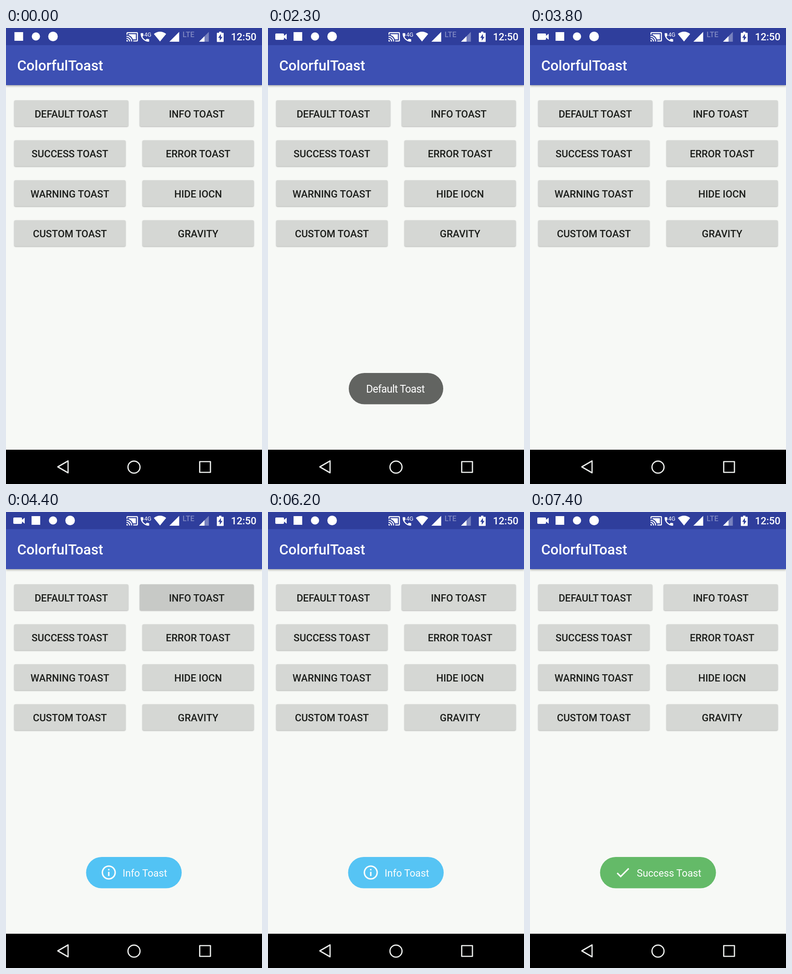
An HTML page for the animation above (8000 ms loop, 561 by 998 pixels).

```html
<!DOCTYPE html>
<html lang="en">
<head>
<meta charset="utf-8">
<title>Colorful toasts</title>
<style>
  html, body { margin: 0; width: 100%; height: 100%; overflow: hidden; background: #f7f9f6; }
  svg { display: block; width: 100%; height: 100%; }
  text { font-family: Roboto, "Noto Sans", sans-serif; }
  .med { font-weight: 500; }
  .bar { filter: drop-shadow(0 2px 2px rgba(0, 0, 0, .32)); }
  .button { fill: #d5d7d4; filter: drop-shadow(0 1.5px 1px rgba(0, 0, 0, .3)); }
  .label { font-size: 21.8px; text-anchor: middle; fill: #1b1d1a; }
  .toast text { fill: #fff; font-size: 21.8px; }
</style>
</head>
<body>
<svg viewBox="0 0 561 998" preserveAspectRatio="none">
  <defs id="clips"></defs>
  <rect width="561" height="998" fill="#f7f9f6"/>
  <rect class="bar" y="37" width="561" height="88" fill="#3d50b3"/>
  <rect width="561" height="37.5" fill="#2f3e9c"/>
  <text class="med" x="24.5" y="93" font-size="31.2" fill="#fff">ColorfulToast</text>

  <!-- status bar -->
  <g fill="#fff">
    <path id="camera" d="M18 12h15q2 0 2 2v3l6-4.5v13l-6-4.500v3q0 2-2 2h-15q-2 0-2-2v-10q0-2 2-2z"/>
    <g id="notes">
      <rect x="56" y="9" width="19" height="19"/>
      <circle cx="103" cy="18.500" r="9"/>
      <circle cx="140.500" cy="18.500" r="10.500"/>
    </g>
    <path transform="translate(262.900 5.600) scale(1.14)" d="M1 18v3h3c0-1.660-1.340-3-3-3zm0-4v2c2.760 0 5 2.240 5 5h2c0-3.870-3.130-7-7-7zm18-7H5v1.630c3.960 1.280 7.090 4.410 8.370 8.370H19V7zM1 10v2c4.970 0 9 4.030 9 9h2c0-6.080-4.930-11-11-11zm20-7H3c-1.100 0-2 .9-2 2v3h2V5h18v14h-7v2h7c1.100 0 2-.9 2-2V5c0-1.100-.9-2-2-2z"/>
    <path transform="translate(291.900 8.200) scale(1.04)" d="M20 15.400q-1.800 0-3.500-.6-.6-.1-1 .3l-2.200 2.200q-4.300-2.200-6.600-6.600l2.200-2.200q.4-.4.2-1-.6-1.700-.6-3.500 0-1-1-1H4q-1 0-1 1A17 17 0 0 0 20 21q1 0 1-1v-3.600q0-1-1-1z"/>
    <text x="303" y="18.500" font-size="12.500">4G</text>
    <path d="M337.500 29.500L324 13Q337.500 3 351 13z"/>
    <path d="M358 30h21.500v-21.500z"/>
    <text class="med" x="387" y="20" font-size="16" opacity=".38">LTE</text>
    <path d="M423 30h21.500v-21.500z" opacity=".35"/>
    <path d="M423 30h12v-12z"/>
    <path d="M467 8h5v2.500h4q1 0 1 1v18q0 1-1 1h-13q-1 0-1-1v-18q0-1 1-1h4z"/>
    <path d="M471 13l-6 8.500h3.500v6.500l6-8.500h-3.500z" fill="#2f3e9c"/>
    <text class="med" x="493" y="27" font-size="22">12:50</text>
  </g>

  <g id="buttons"></g>
  <g id="taps"></g>

  <!-- toasts -->
  <g class="toast">
    <rect x="177" y="755" width="207" height="68.500" rx="34.250" fill="#626461"/>
    <text x="215" y="798" style="font-size:23px;letter-spacing:-.65px">Default Toast</text>
  </g>
  <g class="toast">
    <rect x="175.500" y="755" width="209.500" height="68.500" rx="34.250" fill="#27b5f4"/>
    <g transform="translate(206.500 770.300) scale(1.558)">
      <circle cx="12" cy="12" r="9" fill="none" stroke="#fff" stroke-width="2"/>
      <path d="M11 7h2v2h-2zM11 11h2v6h-2z" fill="#fff"/>
    </g>
    <text x="255.500" y="797.500">Info Toast</text>
  </g>
  <g class="toast">
    <rect x="153.500" y="755" width="254" height="68.500" rx="34.250" fill="#64ba68"/>
    <path transform="translate(184.700 770.300) scale(1.558)" fill="#fff"
      d="M9 16.200L4.800 12l-1.400 1.400L9 19 21 7l-1.400-1.400z"/>
    <text x="234" y="797.500">Success Toast</text>
  </g>

  <!-- navigation bar -->
  <rect y="923" width="561" height="75"/>
  <g fill="none" stroke="#eceeec" stroke-width="2.700" stroke-linejoin="round">
    <path d="M113.500 960.500L136 947.500V973.500z"/>
    <circle cx="280.500" cy="961" r="13.200"/>
    <rect x="424.500" y="949" width="23.500" height="23.500"/>
  </g>
</svg>
<script>
const LOOP = 8000, STEP = 100, FADE = 500;
const el = id => document.getElementById(id);
const clamp = v => Math.max(0, Math.min(1, v));

function add(parent, tag, attrs, text) {
  const node = document.createElementNS("http://www.w3.org/2000/svg", tag);
  for (const key in attrs) node.setAttribute(key, attrs[key]);
  if (text) node.textContent = text;
  return parent.appendChild(node);
}

const labels = ["DEFAULT TOAST", "INFO TOAST", "SUCCESS TOAST", "ERROR TOAST",
  "WARNING TOAST", "HIDE IOCN", "CUSTOM TOAST", "GRAVITY"];

const boxes = labels.map((label, i) => {
  const row = i >> 1, right = i % 2;
  const width = row ? 244 : 250;
  const box = { x: right ? 543 - width : 18, y: 158.3 + row * 87.5, width, height: 57, rx: 3 };
  add(el("buttons"), "rect", { ...box, class: "button" });
  return box;
});

// Each tap presses one button and raises one toast.
const taps = [
  { button: 0, x: 195, y: 184, down: 900, show: 1166, hide: 3170, shade: .08 },
  { button: 1, x: 420, y: 184, down: 3900, show: 4130, hide: 5960, shade: .08 },
  { button: 2, x: 180, y: 273, down: 6700, show: 6890, hide: 8900, shade: 0 }
];
const toasts = document.querySelectorAll(".toast");

taps.forEach((tap, i) => {
  const box = boxes[tap.button];
  add(add(el("clips"), "clipPath", { id: "clip" + i }), "rect", box);
  const group = add(el("taps"), "g", { "clip-path": `url(#clip${i})` });
  tap.press = add(group, "rect", box);
  tap.ripple = add(group, "circle", { cx: tap.x, cy: tap.y });
  tap.dot = add(el("taps"), "circle", { cx: tap.x, cy: tap.y, r: 16.5,
    fill: "#fff", "fill-opacity": .2, stroke: "#fff", "stroke-opacity": .3, "stroke-width": 2 });
  tap.toast = toasts[i];
});

labels.forEach((label, i) => {
  const { x, y, width } = boxes[i];
  add(el("taps"), "text", { class: "label med", x: x + width / 2, y: y + 37.2 }, label);
});

function drawTap(tap, t) {
  const age = t - tap.down;
  const held = age < 0 ? 0 : clamp(age / 150) * clamp((700 - age) / 400);
  tap.press.setAttribute("opacity", tap.shade * held);
  tap.ripple.setAttribute("opacity", .06 * held);
  tap.ripple.setAttribute("r", tap.shade ? 30 + .25 * Math.max(0, age) : Math.min(105, 30 + .25 * Math.max(0, age)));
  tap.dot.setAttribute("opacity", age < 0 ? 0 : clamp((400 - age) / 200));

  const enter = clamp((t - tap.show) / FADE);
  const leave = clamp((t - tap.hide) / FADE);
  tap.toast.setAttribute("opacity", (1 - (1 - enter) ** 2) * (1 - leave ** 2));
}

function draw(now) {
  const t = Math.floor(now % LOOP / STEP) * STEP;
  const slide = clamp(t / 200);
  el("camera").setAttribute("opacity", slide);
  el("notes").setAttribute("transform", `translate(${-37.5 * (1 - slide)} 0)`);
  taps.forEach(tap => drawTap(tap, t));
}

const start = performance.now();
function tick() {
  draw(performance.now() - start);
  requestAnimationFrame(tick);
}
tick();
</script>
</body>
</html>
```
